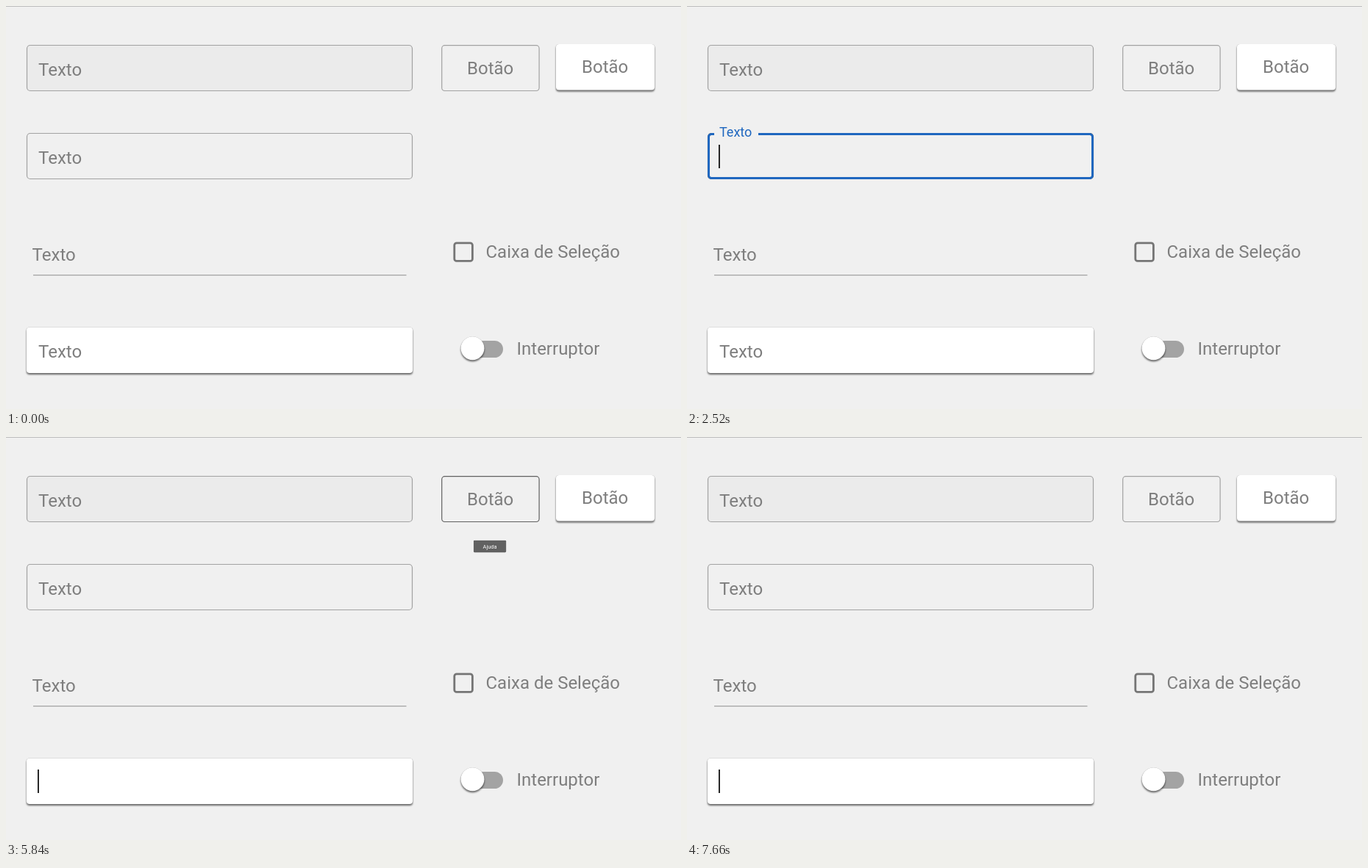
Recreate the animation shown at these times as an HTML page. Size 918x549 px, loop 8000 ms.

```html
<!DOCTYPE html>
<html lang="pt">
<head>
<meta charset="utf-8">
<title>Componentes</title>
<style>
  :root {
    --bg: #f0f0f0;
    --text: #7e7e7e;
    --line: #a2a2a2;
    --dark: #606060;
    --blue: #1f67bf;
    --ease: cubic-bezier(0, 0, .2, 1);
  }
  html, body { margin: 0; width: 100%; height: 100%; overflow: hidden; background: var(--bg); }
  svg { display: block; width: 918px; height: 549px; }
  text { font: 24px Roboto, sans-serif; fill: var(--text); }

  .rim { fill: none; stroke: var(--line); stroke-width: 1.2; }
  .ring { fill: none; stroke: var(--blue); stroke-width: 3; opacity: 0; }
  .notch { transform: scaleX(0); transform-origin: 67px 0; }
  .bar { fill: var(--blue); transform: scaleX(0); transform-origin: 290.5px 0; }
  .caret { fill: #111; opacity: 0; }
  .raised { fill: #fff; filter: drop-shadow(0 2px .8px #0007) drop-shadow(0 0 .7px #0006); }
  .ripple { opacity: 0; }
  .tip { transform: scale(0); transform-origin: 658px 149px; }
  .tip text { font-size: 20px; fill: #fff; text-anchor: middle; }

  /* One loop is 8 s, so 1% is 80 ms. */
  .rim, .ring, .caret, .hide { animation: 8s step-end infinite; }
  .label, .notch, .bar, .tip { animation: 8s var(--ease) infinite; }
  .ripple { animation: 8s ease-in-out infinite; }
  .veil { opacity: 0; animation: veil 8s linear infinite; }

  .one .rim { animation-name: rim1; }
  .two .rim { animation-name: rim2; }
  .three .rim { animation-name: rim3; }
  .outlined .rim { animation-name: rim4; }
  .one .ring { animation-name: ring1; }
  .two .ring { animation-name: ring2; }
  .one .label { animation-name: label1; }
  .two .label { animation-name: label2; }
  .three .label { animation-name: label3; }
  .one .notch { animation-name: open1; }
  .two .notch { animation-name: open2; }
  .three .bar { animation-name: open3; }
  .one .caret { animation-name: caret1; }
  .two .caret { animation-name: caret2; }
  .three .caret { animation-name: caret3; }
  .four .caret { animation-name: caret4; }
  .hide { animation-name: hide; }
  .tip { animation-name: tip; }
  .outlined .ripple { transform-origin: 665px 95px; animation-name: ripple1; }
  .elevated .ripple { transform-origin: 845px 95px; animation-name: ripple2; }

  /* hover */
  @keyframes rim1 {
    0%, 29%, 66.25%, 100% { stroke: var(--line); }
    10.375%, 59.375% { stroke: var(--dark); }
  }
  @keyframes rim2 {
    0%, 33.5%, 56.25%, 100% { stroke: var(--line); }
    26.375%, 55.625% { stroke: var(--dark); }
  }
  @keyframes rim3 {
    0%, 46.625%, 55.625%, 100% { stroke: var(--line); }
    33.5%, 55% { stroke: var(--dark); }
  }
  @keyframes rim4 {
    0%, 79.75%, 100% { stroke: var(--line); }
    66.875% { stroke: var(--dark); }
  }

  /* focus */
  @keyframes ring1 { 0%, 29%, 100% { opacity: 0; } 14.25% { opacity: 1; } }
  @keyframes ring2 { 0%, 37.625%, 100% { opacity: 0; } 29% { opacity: 1; } }
  @keyframes label1 {
    0%, 14.25%, 31.5%, 100% { transform: translateY(0) scale(1); fill: var(--text); }
    16.75%, 29% { transform: translateY(-37px) scale(.75); fill: var(--blue); }
  }
  @keyframes label2 {
    0%, 29%, 40%, 100% { transform: translateY(0) scale(1); fill: var(--text); }
    31.5%, 37.625% { transform: translateY(-37px) scale(.75); fill: var(--blue); }
  }
  @keyframes label3 {
    0%, 37.625%, 49.125%, 100% { transform: translateY(0) scale(1); fill: var(--text); }
    40%, 46.625% { transform: translateY(-37px) scale(.75); fill: var(--blue); }
  }
  @keyframes open1 {
    0%, 14.25%, 31.5%, 100% { transform: scaleX(0); }
    16.75%, 29% { transform: scaleX(1); }
  }
  @keyframes open2 {
    0%, 29%, 40%, 100% { transform: scaleX(0); }
    31.5%, 37.625% { transform: scaleX(1); }
  }
  @keyframes open3 {
    0%, 37.625%, 49.125%, 100% { transform: scaleX(0); }
    40%, 46.625% { transform: scaleX(1); }
  }
  @keyframes hide { 0% { opacity: 1; } 46.625%, 100% { opacity: 0; } }

  /* blinking */
  @keyframes caret1 { 0%, 20%, 29%, 100% { opacity: 0; } 14.25%, 25.75% { opacity: 1; } }
  @keyframes caret2 { 0%, 35.125%, 100% { opacity: 0; } 29% { opacity: 1; } }
  @keyframes caret3 { 0%, 43.5%, 100% { opacity: 0; } 37.625% { opacity: 1; } }
  @keyframes caret4 {
    0%, 52.875%, 65.5%, 77.75%, 90.125% { opacity: 0; }
    46.625%, 59.375%, 71.625%, 84%, 95.75%, 100% { opacity: 1; }
  }

  /* buttons */
  @keyframes tip {
    0%, 72.6875% { transform: scale(0); opacity: 1; }
    75.1875% { transform: scale(1); opacity: 1; }
    88.5% { transform: scale(1); opacity: 1; animation-timing-function: linear; }
    89.875%, 100% { transform: scale(1); opacity: 0; }
  }
  @keyframes ripple1 {
    0%, 73.124% { transform: scale(0); opacity: 0; }
    73.125% { transform: scale(0); opacity: .16; }
    76.125% { transform: scale(1); opacity: .16; }
    77.75%, 100% { transform: scale(1); opacity: 0; }
  }
  @keyframes ripple2 {
    0%, 87.499% { transform: scale(0); opacity: 0; }
    87.5% { transform: scale(0); opacity: .16; }
    90.5% { transform: scale(1); opacity: .16; }
    92.375%, 100% { transform: scale(1); opacity: 0; }
  }
  @keyframes veil {
    0%, 87.499% { opacity: 0; }
    87.5%, 90.5% { opacity: .04; }
    92.375%, 100% { opacity: 0; }
  }
</style>
</head>
<body>
<svg viewBox="0 0 918 549">
  <defs>
    <clipPath id="flat"><rect x="592" y="53" width="133.5" height="63" rx="4"/></clipPath>
    <clipPath id="high"><rect x="748" y="52" width="134" height="62.5" rx="4"/></clipPath>
  </defs>
  <rect width="918" height="1" fill="#bdbdbd"/>

  <g class="one">
    <rect x="28.5" y="53.5" width="524" height="62" rx="4.5" fill="#ebebeb"/>
    <rect class="rim" x="28.5" y="53.5" width="524" height="62" rx="4.5"/>
    <rect class="ring" x="29.5" y="54.5" width="522" height="60" rx="4"/>
    <rect class="notch" x="37" y="52.5" width="60" height="4" fill="#ececec"/>
    <g transform="translate(44 95)"><text class="label">Texto</text></g>
    <rect class="caret" x="43" y="69" width="1.8" height="32"/>
  </g>

  <g class="two">
    <rect class="rim" x="28.5" y="173.5" width="524" height="62" rx="4.5"/>
    <rect class="ring" x="29.5" y="174.5" width="522" height="60" rx="4"/>
    <rect class="notch" x="37" y="172.5" width="60" height="4" fill="#f0f0f0"/>
    <g transform="translate(44 215)"><text class="label">Texto</text></g>
    <rect class="caret" x="43" y="189" width="1.8" height="32"/>
  </g>

  <g class="three">
    <path class="rim" d="M37 366.6H544.5"/>
    <rect class="bar" x="36.5" y="365.2" width="508" height="3"/>
    <g transform="translate(35.6 347)"><text class="label">Texto</text></g>
    <rect class="caret" x="37" y="320" width="1.8" height="32"/>
  </g>

  <g class="four">
    <rect class="raised" x="28" y="437.5" width="525" height="62.5" rx="4"/>
    <text class="hide" x="44" y="479">Texto</text>
    <rect class="caret" x="43" y="453" width="1.8" height="32"/>
  </g>

  <g class="outlined">
    <rect class="rim" x="592.7" y="53.7" width="132.4" height="61.8" rx="4"/>
    <text x="627" y="93">Botão</text>
    <g clip-path="url(#flat)"><circle class="ripple" cx="665" cy="95" r="86"/></g>
  </g>

  <g class="elevated">
    <rect class="raised" x="748" y="52" width="134" height="62.5" rx="4"/>
    <text x="783" y="91">Botão</text>
    <g clip-path="url(#high)">
      <rect class="veil" x="748" y="52" width="134" height="63"/>
      <circle class="ripple" cx="845" cy="95" r="106"/>
    </g>
  </g>

  <g class="tip">
    <rect x="598" y="126.5" width="120" height="45" rx="4" fill="#616161"/>
    <text x="658" y="156">Ajuda</text>
  </g>

  <rect x="609.8" y="322.8" width="24.6" height="24.6" rx="3" fill="none" stroke="#757575" stroke-width="2.8"/>
  <text x="652.5" y="343">Caixa de Seleção</text>

  <rect x="622" y="456" width="54" height="23" rx="11.5" fill="#a3a3a3"/>
  <circle class="raised" cx="634.5" cy="466.3" r="16"/>
  <text x="694.5" y="475">Interruptor</text>
</svg>
</body>
</html>
```
